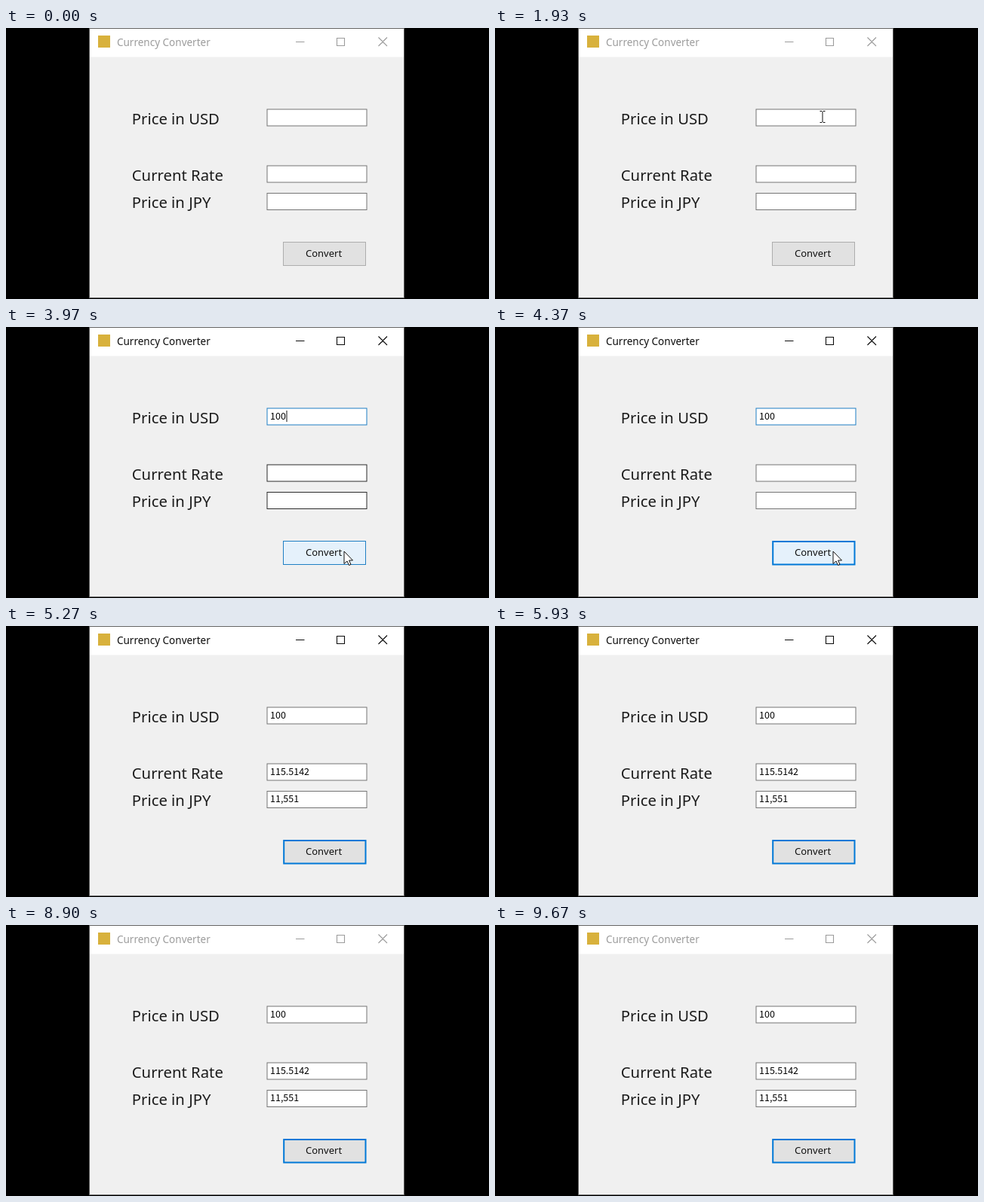
An HTML page for the animation above (9730 ms loop, 640 px wide and 360 px high).

```html
<!DOCTYPE html>
<html lang="en">
<head>
<meta charset="utf-8">
<title>Currency Converter</title>
<style>
  html, body { margin: 0; width: 100%; height: 100%; overflow: hidden; background: #000; }
  svg { display: block; width: 100vw; height: 100vh; }
  text { font-family: "Noto Sans", sans-serif; fill: #111; white-space: pre; }
  .label { font-size: 20.3px; fill: #1c1c1c; }
  .value { font: 500 12.5px "Noto Sans CJK JP", "Noto Sans", sans-serif; fill: #000; }
  .field { fill: #fff; stroke: #747474; }
  .field.hot { stroke: #2b2b2b; }
  .field.focus { stroke: #1f7fc4; }
  #chrome { color: #0c0c0c; }
  #chrome.idle { color: #9c9c9c; }
  #chrome text { font-size: 13.5px; fill: currentColor; }
  #chrome path { fill: none; stroke: currentColor; stroke-width: 1.1; }
  #button { x: 367.5px; y: 284.5px; width: 109px; height: 31px; fill: #e1e1e1; stroke: #adadad; }
  #button.hover { fill: #e5f1fb; stroke: #1f7fc4; }
  #button.pressed { fill: #cce4f7; }
  #button.focus { x: 368.2px; y: 285px; width: 108.3px; height: 30.5px; stroke: #0078d7; stroke-width: 2; }
</style>
</head>
<body>
<svg viewBox="0 0 640 360">
  <rect x="110" width="418" height="359" fill="#626262"/>
  <rect x="111" y="1" width="416" height="357" fill="#f0f0f0"/>
  <rect x="111" y="1" width="416" height="37.5" fill="#fff"/>
  <rect x="122" y="10" width="16" height="16" fill="#d8b13c"/>

  <g id="chrome">
    <text x="147" y="24">Currency Converter</text>
    <path d="M384 18.5H395.5M438.5 13.5h10v10h-10zM493.5 12.5l11.5 11.5M505 12.5l-11.5 11.5"/>
  </g>

  <text class="label" x="166.8" y="128">Price in USD</text>
  <text class="label" x="166.8" y="203">Current Rate</text>
  <text class="label" x="166.8" y="239">Price in JPY</text>

  <rect id="usdField" class="field" x="346" y="108" width="132" height="22"/>
  <rect id="rateField" class="field" x="346" y="183" width="132" height="22"/>
  <rect id="jpyField" class="field" x="346" y="219.5" width="132" height="22"/>
  <text id="usd" class="value" x="350" y="123"></text>
  <text id="rate" class="value" x="350" y="198"></text>
  <text id="jpy" class="value" x="350" y="234"></text>
  <rect id="caret" y="111" width="1" height="15" fill="#111"/>

  <rect id="button"/>
  <text x="397" y="304" font-size="13">Convert</text>

  <g id="pointer">
    <path id="beam" d="M-3.5 -7.5h2.5l1 1 1 -1h2.5M0 -6.5V6.5M-3.5 7.5h2.5l1 -1 1 1h2.5" fill="none" stroke="#111"/>
    <path id="arrow" d="M0 0V16.5L4 13L6.5 18.5L9 17.4L6.6 12H11.5Z" fill="#fff" stroke="#111"/>
  </g>
</svg>
<script>
  const LOOP = 9730;
  const ENTER = 1930, ACTIVATE = 2500, TYPE = 3100, MOVE = 3500;
  const PRESS = 4100, RELEASE = 4230, RESULT = 4570, LEAVE = 5100, GONE = 5240, DEACTIVATE = 8900;

  const $ = id => document.getElementById(id);
  const within = (t, from, to) => t >= from && t < to;
  const show = (id, on) => $(id).setAttribute('visibility', on ? 'visible' : 'hidden');
  const mark = (id, name, on) => $(id).classList.toggle(name, on);

  const typed = [[3370, '100'], [3200, '10'], [TYPE, '1'], [0, '']];
  // [time, x, y]
  const path = [[0, 434, 118], [MOVE, 434, 118], [3900, 448, 298], [LEAVE, 448, 298], [GONE, 462, 362]];

  function pointerAt(t) {
    const i = path.findIndex(p => p[0] > t);
    if (i < 0) return path[path.length - 1].slice(1);
    const [t0, x0, y0] = path[i - 1], [t1, x1, y1] = path[i];
    const u = (t - t0) / (t1 - t0), ease = u * u * (3 - 2 * u);
    return [x0 + (x1 - x0) * ease, y0 + (y1 - y0) * ease];
  }

  function render(t) {
    const [x, y] = pointerAt(t);
    const text = typed.find(step => t >= step[0])[1];
    const done = t >= RESULT;

    mark('chrome', 'idle', !within(t, ACTIVATE, DEACTIVATE));
    mark('usdField', 'focus', within(t, ACTIVATE, RESULT));
    // Fields the pointer has crossed keep their dark outline until the click.
    mark('rateField', 'hot', y > 183 && t < PRESS);
    mark('jpyField', 'hot', y > 219 && t < PRESS);
    $('usd').textContent = text;
    $('rate').textContent = done ? '115.5142' : '';
    $('jpy').textContent = done ? '11,551' : '';
    $('caret').setAttribute('x', 350.5 + text.length * 7);
    show('caret', within(t, ACTIVATE, PRESS));

    const visible = within(t, ENTER, TYPE) || within(t, MOVE, GONE);
    const overField = y < 130;
    $('pointer').setAttribute('transform', `translate(${x} ${y})`);
    show('beam', visible && overField);
    show('arrow', visible && !overField);

    mark('button', 'hover', visible && y > 284 && y < 316);
    mark('button', 'pressed', within(t, PRESS, RELEASE));
    mark('button', 'focus', t >= PRESS);
  }

  const start = performance.now();
  function tick() {
    render((performance.now() - start) % LOOP);
    requestAnimationFrame(tick);
  }
  tick();
</script>
</body>
</html>
```
